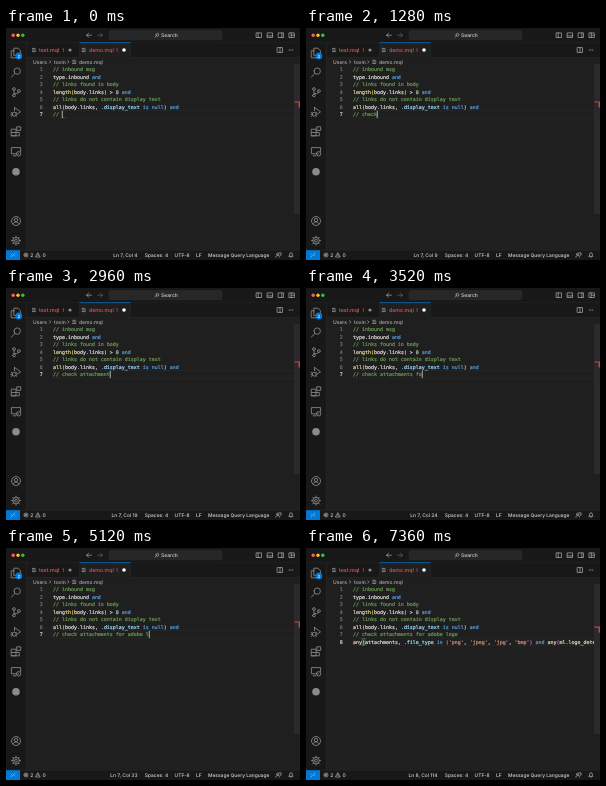
Recreate the animation shown at these times as an HTML page. Size 294 px wide and 232 px high, loop 8 s.

```html
<!DOCTYPE html>
<html lang="en">
<head>
<meta charset="utf-8">
<title>Editor typing</title>
<style>
  html, body { margin: 0; width: 100%; height: 100%; overflow: hidden; background: #1f1f1f; }
  svg { display: block; width: 294px; height: 232px; }
  text { white-space: pre; text-rendering: geometricPrecision; font-family: Inter, sans-serif; font-weight: 500; }
  .code { font: 4.98px "DejaVu Sans Mono", monospace; stroke: currentColor; stroke-width: .2; }
  .icon { fill: none; stroke: #8b8b8b; stroke-width: .85; stroke-linejoin: round; stroke-linecap: round; }
  .light { stroke: #c5c5c5; stroke-width: .6; }
</style>
</head>
<body>
<svg id="stage" viewBox="0 0 294 232"></svg>
<script>
const LOOP = 8000, BLINK = 480;
const LEFT = 47, TOP = 37.8, CHAR = 3, LINE = 7.48;
const C = {
  note: '#6a9955', plain: '#dcdcdc', word: '#569cd6', call: '#dcdcaa', prop: '#9cdcfe',
  num: '#b5cea8', str: '#ce9178', gold: '#ffd700', pink: '#da70d6'
};
const COMMENT = '// check attachments for adobe logo';

// time, characters typed, characters counted in the status bar if it lags
const KEYS = [
  [-1280, 3], [880, 4], [1040, 5], [1120, 6], [1200, 7], [1280, 8], [1520, 9], [1600, 10],
  [1920, 11], [2080, 12], [2240, 13], [2320, 14], [2480, 15], [2720, 16], [2800, 17],
  [2960, 19, 18], [3040, 19], [3200, 20], [3280, 21], [3440, 22], [3520, 23], [3600, 24],
  [3680, 25], [3920, 26], [4480, 27], [4640, 28], [4720, 29], [4800, 30], [4960, 31],
  [5120, 32], [5360, 33], [5520, 34], [5600, 35]
];
const ENTER = 6080, SETTLE = 6160, PASTE = 7280, PASTED = 7360;

const rect = (x, y, w, h, fill, extra = '') =>
  `<rect x="${x}" y="${y}" width="${w}" height="${h}" fill="${fill}" ${extra}/>`;
const dot = (x, y, r, fill) => `<circle cx="${x}" cy="${y}" r="${r}" fill="${fill}"/>`;
const label = (x, y, s, fill = '#d4d4d4', size = 5, extra = '') =>
  `<text x="${x}" y="${y + size * .36}" font-size="${size}" fill="${fill}" ${extra}>${s}</text>`;
const icon = (x, y, d, cls = '') => `<path class="icon ${cls}" transform="translate(${x} ${y})" d="${d}"/>`;
const lineY = n => TOP + (n - 1) * LINE;
const code = (n, parts, extra = '') =>
  `<text class="code" x="${LEFT}" y="${lineY(n) + 5.5}" ${extra}>` +
  parts.map(([color, s]) =>
    `<tspan fill="${C[color]}" stroke="${C[color]}">${s.replace('>', '&gt;')}</tspan>`).join('') + '</text>';
const lineNo = n => `<text id="no${n}" class="code" x="36.8" y="${lineY(n) + 5.5}" text-anchor="end"
  fill="currentColor" color="#6e7681">${n}</text>`;
const ring = (r, x = 0, y = 0) => `M${x - r} ${y}a${r} ${r} 0 1 0 ${2 * r} 0a${r} ${r} 0 1 0 ${-2 * r} 0`;
const listIcon = (x, y) => icon(x, y, 'M-1.6-1.6h2.6M-1.6 0h3.4M-1.6 1.6h3', 'light');
const chevron = (x, y) => icon(x, y, 'M-.6-1.2l1.2 1.2l-1.2 1.2', 'light');

function titleBar() {
  return rect(0, 0, 294, 14.3, '#181818') + rect(0, 14, 294, .5, '#2b2b2b') +
    dot(7.2, 7.2, 1.7, '#ff5f57') + dot(12, 7.2, 1.7, '#febc2e') + dot(16.8, 7.2, 1.7, '#28c840') +
    icon(83, 7.2, 'M2.4 0h-4.8m2-2l-2 2l2 2', 'light') +
    icon(94, 7.2, 'M-2.4 0h4.8m-2-2l2 2l-2 2', 'light" opacity=".5') +
    rect(103, 2.6, 113, 9.2, '#272727', 'rx="2" stroke="#343434" stroke-width=".4"') +
    icon(151, 7.2, ring(1.4, .4, -.4) + 'M-.6.6l-1.4 1.4', 'light') +
    label(155, 7.2, 'Search') +
    [253, 264, 275, 285.8].map((x, i) => icon(x, 7.2, 'M-2.5-2.3h5v4.6h-5z' +
      ['M-.8-2.3v4.6', 'M-2.5.7h5', 'M.8-2.3v4.6', 'M-.6-2.3v4.6M-.6 0h3.1'][i], 'light')).join('');
}

function activityBar() {
  return rect(0, 14.5, 20, 208, '#181818') + rect(20, 14.5, .5, 208, '#2b2b2b') +
    icon(9.8, 25, 'M-1.6-4.8h3.8l2.4 2.4v4.8h-6.2zM-1.6-2.2h-3v7h6.2v-2.4', '') +
    dot(12.8, 28, 3.4, '#0078d4') + label(12.8, 28, '2', '#fff', 4.4, 'text-anchor="middle"') +
    icon(10, 44.3, ring(3.2, 1.2, -1.2) + 'M-1.1 1.1l-3.5 3.7') +
    icon(10, 64.2, ring(1.4, -2, -3.2) + ring(1.4, -2, 3.2) + ring(1.4, 2.9, -1.2) + 'M-2-1.8v3.6M2.9.2c0 1.8-4.9.4-4.9 1.6') +
    icon(10, 84, 'M-1.5-4.6l6 4.4l-4.4 3.2M-1.5-4.6v3.2' + ring(2, -1.8, 2.2) + 'M-4.8.4l1.2.8M-5 2.4h1.2M-4.8 4.4l1.2-.8M-.2.9l.8-.6M-.2 3.7l.8.6') +
    icon(10, 103.4, 'M-4.4-2.2h4.4v6.6h-4.4zM-4.4 1.1h7.7v3.3h-7.7M1.1-4.6h3.6v3.6h-3.6z') +
    icon(10, 123.6, 'M4.6 0v-4h-9.2v6.2h4.2M-2.8 4.2h2.6' + ring(2.2, 2.6, 2.2) + 'M1.8 1.6l.8.6l-.8.6') +
    dot(10, 143.7, 3.8, '#8b8b8b') +
    icon(10, 193, ring(4.5) + ring(1.7, 0, -1) + 'M-2.9 3.3c.4-3.2 5.4-3.2 5.8 0') +
    icon(10, 212.6, ring(1.4) + ring(3.3) + 'M0-3.3v-1.3M0 3.3v1.3M-3.3 0h-1.3M3.3 0h1.3M-2.3-2.3l-1 -1M2.3-2.3l1-1M-2.3 2.3l-1 1M2.3 2.3l1 1');
}

function tabs() {
  const red = '#f1544c', grey = '#b0b0b0', y = 22, crumbs = 33.9;
  return rect(20.5, 14.5, 273.5, 15, '#181818') + rect(20.5, 29.2, 273.5, .5, '#2b2b2b') +
    rect(73.5, 14.5, 51, 15.4, '#1f1f1f') + rect(73.5, 14.4, 51, .7, '#0078d4') +
    rect(73.2, 14.5, .4, 15, '#2b2b2b') + rect(124.3, 14.5, .4, 15, '#2b2b2b') +
    listIcon(28, y) + label(33, y, 'test.mql', red, 5.3) + label(56.2, y, '1', red, 4.8) +
    dot(64, y, 1.6, '#8a8a8a') +
    listIcon(77.8, y) + label(83, y, 'demo.mql', red, 5.2) + label(109.8, y, '1', red, 4.8) +
    dot(118, y, 1.8, '#fff') +
    icon(274, y, 'M-2.5-2.4h5v4.8h-5zM0-2.4v4.8', 'light') +
    [283.3, 285, 286.7].map(x => dot(x, y, .5, '#c5c5c5')).join('') +
    label(27, crumbs, 'Users', grey, 5) + chevron(44.2, crumbs) +
    label(48, crumbs, 'tovin', grey, 5) + chevron(62.3, crumbs) +
    listIcon(68.3, crumbs) + label(73, crumbs, 'demo.mql', grey, 5);
}

function editor() {
  let s = rect(LEFT, 0, 241, LINE, 'none', 'id="current" stroke="#2d2d2d" stroke-width=".5"');
  for (let n = 1; n <= 8; n++) s += lineNo(n);
  return s +
    code(1, [['note', '// inbound msg']]) +
    code(2, [['plain', 'type.inbound '], ['word', 'and']]) +
    code(3, [['note', '// links found in body']]) +
    code(4, [['call', 'length'], ['gold', '('], ['plain', 'body.links'], ['gold', ')'],
      ['plain', ' > '], ['num', '0 '], ['word', 'and']]) +
    code(5, [['note', '// links do not contain display text']]) +
    code(6, [['call', 'all'], ['gold', '('], ['plain', 'body.links, '], ['prop', '.display_text '],
      ['word', 'is null'], ['gold', ')'], ['word', ' and']]) +
    `<text id="typed" class="code" x="${LEFT}" y="${lineY(7) + 5.5}" fill="currentColor" color="${C.note}"></text>` +
    rect(LEFT + 9, lineY(8) + .4, 3, 6.8, '#1d3a2a', 'id="match" stroke="#888" stroke-width=".4"') +
    code(8, [['call', 'any'], ['gold', '('], ['plain', 'attachments, '], ['prop', '.file_type '],
      ['word', 'in '], ['pink', '('], ['str', "'png'"], ['plain', ', '], ['str', "'jpeg'"], ['plain', ', '],
      ['str', "'jpg'"], ['plain', ', '], ['str', "'bmp'"], ['pink', ')'], ['word', ' and '],
      ['call', 'any'], ['pink', '('], ['call', 'ml.logo_detect']], 'id="pasted"') +
    '<path id="squiggle" d="M.3 .5l.7-.7l.7.7l.7-.7" fill="none" stroke="#f14c4c" stroke-width=".7"/>' +
    rect(0, 0, .8, 7.4, '#d0d0d0', 'id="caret"') +
    rect(288, 36, 6, 150, '#2a2a2c') +
    '<path id="mark" d="M288.4 0h5.6v6h-1.4v-4.8h-4.2z" fill="#c8443f"/>';
}

function statusBar() {
  const y = 227;
  return rect(0, 222, 294, 10, '#181818') + rect(0, 221.8, 294, .5, '#2b2b2b') +
    rect(0, 222.2, 14, 9.8, '#0078d4') +
    icon(7, y, 'M-2-.8l1.6 1.4l-1.6 1.4M2-2l-1.6 1.4l1.6 1.4', 'light') +
    icon(20, y, ring(2) + 'M-.8-.8l1.6 1.6M.8-.8l-1.6 1.6', 'light') + label(24.2, y, '2') +
    icon(32, y, 'M0-2l2.2 4h-4.4zM0-.6v1.2', 'light') + label(36.4, y, '0') +
    label(131.5, y, '', '#d4d4d4', 4.9, 'id="pos" text-anchor="end"') +
    label(138.8, y, 'Spaces: 4', '#d4d4d4', 4.9) + label(168.6, y, 'UTF-8', '#d4d4d4', 4.9) + label(190, y, 'LF') +
    label(202, y, 'Message Query Language', '#d4d4d4', 4.9) +
    icon(272.5, y, ring(1.1, -.8, -.8) + 'M-2.6 2.2c0-2.6 3.6-2.6 3.6 0M.6-2.2h2v2.4h-1', 'light') +
    icon(285, y, 'M-2 1.3h4l-.6-1v-1.2c0-1.8-2.8-1.8-2.8 0v1.2zM-.5 2h1', 'light');
}

const $ = id => document.getElementById(id);
$('stage').innerHTML = rect(0, 0, 294, 232, '#1f1f1f') + editor() + titleBar() + tabs() + activityBar() + statusBar();
const show = (id, on) => $(id).setAttribute('visibility', on ? 'visible' : 'hidden');
const place = (id, x, y) => $(id).setAttribute('transform', `translate(${x} ${y})`);

function draw(t) {
  const [at, count, counted = count] = KEYS.findLast(k => k[0] <= t);
  const next = t >= ENTER, pasted = t >= PASTE;
  const row = next ? 8 : 7, column = next ? 0 : count;
  const since = t - (t >= SETTLE ? SETTLE : next ? ENTER : at);
  const x = LEFT + column * CHAR;

  $('typed').textContent = COMMENT.slice(0, count);
  $('pos').textContent = `Ln ${row}, Col ${t >= PASTED ? 114 : next ? 1 : counted + 1}`;
  $('no7').setAttribute('color', next ? '#6e7681' : '#d4d4d4');
  $('no8').setAttribute('color', '#d4d4d4');
  show('no8', next);
  show('pasted', pasted);
  show('match', t >= PASTED);
  show('caret', !pasted && Math.floor(since / BLINK) % 2 === 0);
  show('squiggle', !pasted && (next || since >= BLINK));
  place('caret', x - .2, lineY(row));
  place('squiggle', x, lineY(row) + 6.9);
  place('current', 0, lineY(row));
  place('mark', 0, next ? 78.6 : 73.4);
}

const start = performance.now();
function tick() {
  draw((performance.now() - start) % LOOP);
  requestAnimationFrame(tick);
}
tick();
</script>
</body>
</html>
```
